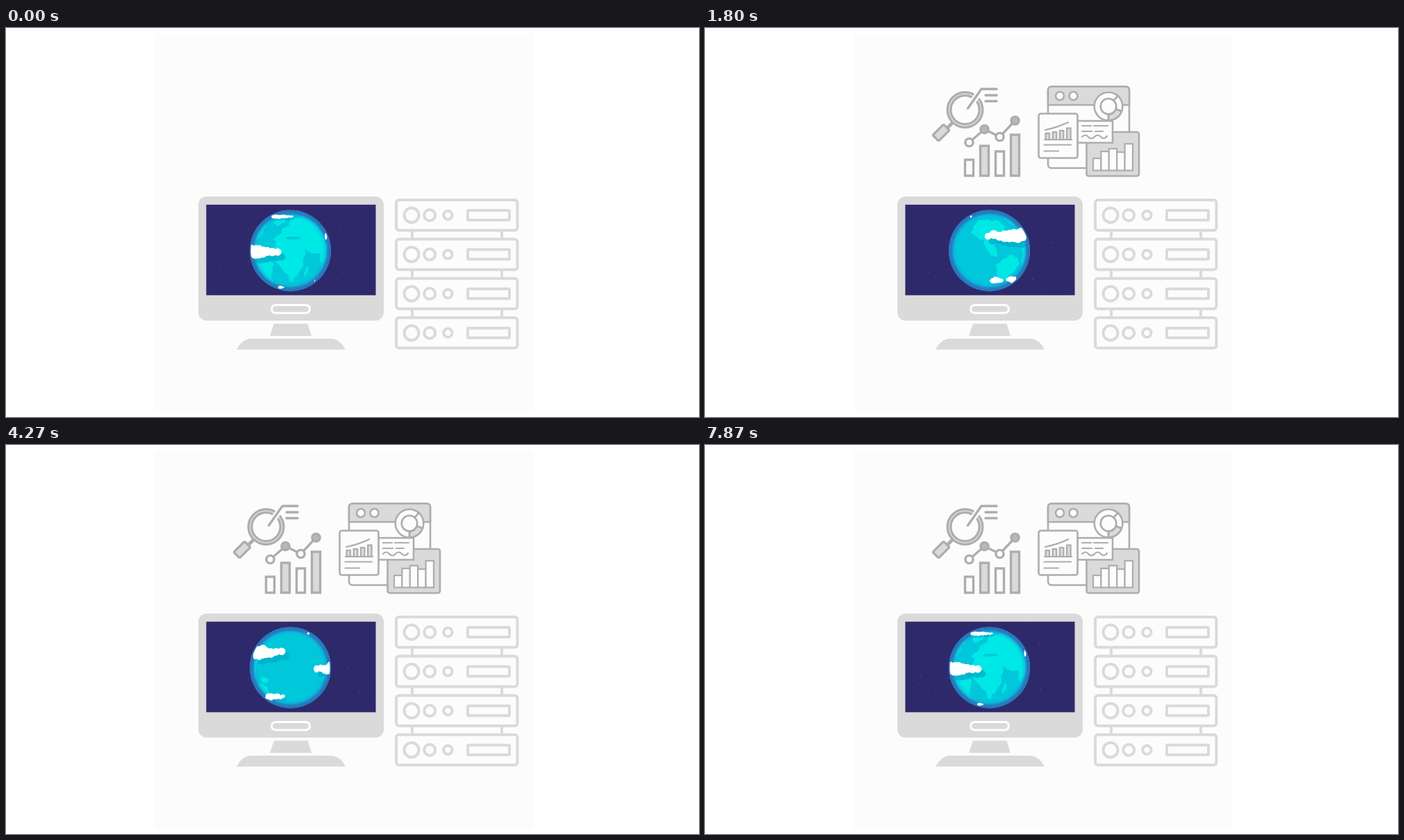
Write an HTML page with a canvas that moves like this. It is 998 px wide and 561 px high and loops after 7.91 s.

```html
<!DOCTYPE html>
<html lang="en">
<head>
<meta charset="utf-8">
<title>Globe on a monitor</title>
<style>
  html, body { margin: 0; width: 100%; height: 100%; overflow: hidden; background: #fff; }
  svg, canvas { position: absolute; display: block; }
  svg { left: 0; top: 0; width: 998px; height: 561px; }
  canvas { left: 288px; top: 254px; width: 246px; height: 133px; }
  .line { fill: none; stroke: #adadad; stroke-width: 3.4; stroke-linecap: round; stroke-linejoin: round; }
  .medium { stroke-width: 2.6; }
  .thin { stroke-width: 2.2; }
  .white { fill: #fcfcfc; }
  .light { fill: #dadada; }
  .dark { fill: #b8b8b8; }
  .rack { fill: none; stroke: #dadada; stroke-width: 4; }
</style>
</head>
<body>
<svg viewBox="0 0 998 561">
  <rect x="214" y="8" width="546" height="545" fill="#fcfcfc"/>

  <g fill="#dadada">
    <rect x="277" y="243" width="267" height="179" rx="12"/>
    <rect x="382.5" y="399.5" width="55" height="11.5" rx="5.7" stroke="#fff" stroke-width="3"/>
    <path d="M386 426.5H434.5L440 444H380Z"/>
    <path d="M332 463.7C337 454 344 448 354 448H467C477 448 484 454 488.8 463.7Z"/>
  </g>

  <g id="racks" class="rack"></g>

  <g id="icons" class="line" visibility="hidden">
    <g id="magnifier">
      <path d="M356 137L348 145" stroke-width="5"/>
      <rect class="light" x="-11" y="-6" width="22" height="12" rx="2" transform="translate(340 151) rotate(-45)"/>
      <circle class="white" cx="374.5" cy="118" r="23" stroke-width="8"/>
      <circle cx="374.5" cy="118" r="23" stroke="#d2d2d2" stroke-width="2"/>
      <path d="M380 114L397 90" stroke="#fcfcfc" stroke-width="9"/>
      <path d="M378.5 116L398 88H420M404 97H420M404 105.5H420"/>
    </g>
    <g id="trend"></g>
    <g id="dashboard" class="medium">
      <rect class="white" x="494" y="84.5" width="117" height="117.5" rx="5"/>
      <path class="light" d="M494 111V89.5Q494 84.5 499 84.5H606Q611 84.5 611 89.5V111Z"/>
      <circle class="white" cx="511" cy="98" r="6"/>
      <circle class="white" cx="530.5" cy="98" r="6"/>
      <rect class="light" x="549.5" y="150" width="75.5" height="63.5" rx="3"/>
      <g id="bigBars" class="thin"></g>
      <rect class="white" x="536" y="134" width="51" height="31.5"/>
      <path class="thin" d="M543 141H556M560 141H580M543 149H557M562 149H573M543 157q4.5 -5 9 0t9 0t9 0t9 -1"/>
      <circle class="white" cx="581" cy="113" r="20.3"/>
      <path class="light" d="M600 120A20.3 20.3 0 0 1 581 133.3V124.5A11.5 11.5 0 0 0 591.5 117Z"/>
      <circle class="white" cx="581" cy="113" r="11.3"/>
      <path d="M588.5 104.5L595 97.5M591.5 117L600 120M581 124.5V133"/>
      <rect class="white" x="480.5" y="123.5" width="56" height="64" rx="3"/>
      <path class="thin" d="M490 147Q509 143 523 136M488.5 168.5H527M488.5 177.5H509M489 161H528"/>
      <g id="smallBars" class="thin"></g>
    </g>
  </g>
</svg>
<canvas id="screen"></canvas>

<script>
const LOOP = 7910, RAD = Math.PI / 180, TAU = 2 * Math.PI;
const R = 56, CX = 409.5, CY = 321, LAND_START = -18;
const SCREEN = [288.4, 254.8, 244.1, 130.6];
const byId = id => document.getElementById(id);

let seed = 17;
const random = () => (seed = seed * 16807 % 2147483647) / 2147483647;

function add(parent, tag, attrs) {
  const node = document.createElementNS('http://www.w3.org/2000/svg', tag);
  for (const key in attrs) node.setAttribute(key, attrs[key]);
  byId(parent).append(node);
}

// Server units
for (let i = 0; i < 4; i++) {
  const y = 248 + 56.6 * i;
  add('racks', 'rect', { x: 562, y, width: 174.5, height: 43.8, rx: 4 });
  [10.5, 8, 6.2].forEach((r, k) => add('racks', 'circle', { cx: 584 + 26.2 * k, cy: y + 22, r }));
  add('racks', 'rect', { x: 665, y: y + 15, width: 60, height: 14, rx: 1 });
  if (i < 3) add('racks', 'path', { d: `M585 ${y + 45}v11M714 ${y + 45}v11` });
}

function bars(parent, x, base, width, step, heights, styles) {
  heights.forEach((height, i) => add(parent, 'rect', {
    x: x + step * i, y: base - height, width, height,
    class: styles[i % styles.length], 'stroke-linejoin': 'miter'
  }));
}
bars('trend', 374.5, 213, 12, 22, [23, 43, 35, 59], ['white', 'light']);
bars('bigBars', 559, 205.5, 11.4, 11.4, [17.5, 27.5, 31.5, 26.5, 38.5], ['white']);
bars('smallBars', 490.5, 161, 5.5, 10.2, [9, 11, 13, 16.5], ['light']);

const levels = [165, 146, 157, 133.5];
add('trend', 'path', { d: 'M' + levels.map((y, i) => `${380.5 + 22 * i} ${y}`).join('L') });
levels.forEach((cy, i) => add('trend', 'circle', {
  cx: 380.5 + 22 * i, cy, r: 5.6, class: i % 2 ? 'dark' : 'white'
}));

// Land: a rough oval that narrows and leans toward its lower end.
function land(lon, y, width, height, taper = 0, lean = 0) {
  const p = random() * TAU, q = random() * TAU;
  return Array.from({ length: 48 }, (_, i) => {
    const a = i / 48 * TAU, s = Math.sin(a);
    const rough = 1 + 0.07 * Math.sin(5 * a + p) + 0.06 * Math.sin(11 * a + q);
    return [lon + width * rough * Math.cos(a) * (1 - taper * s) + lean * s, y + height * rough * s];
  });
}
const lands = [
  land(66, -24, 68, 26, -0.1),      // Eurasia
  land(18, 14, 22, 30, 0.5, 4),     // Africa
  land(78, 10, 9, 12, 0.6),         // India
  land(108, 6, 12, 18, 0.3, -3),    // Southeast Asia
  land(123, 32, 17, 9),             // Australia
  land(139, 18, 8, 4),              // New Guinea
  land(47, 30, 3, 7),               // Madagascar
  land(-64, -28, 30, 17, 0.3, 4),   // North America
  land(-62, -4, 7, 13, 0, 7),       // Central America
  land(-33, 29, 18, 21, 0.5, -5),   // South America
  land(-8, -43, 14, 7, 0.4)         // Greenland
];
const mediterranean = land(22, -18, 12, 2);

// Cloud bank: overlapping puffs, largest in the middle.
function bank(from, to, y, size) {
  const count = Math.ceil((to - from) * RAD * Math.sqrt(R * R - y * y) / (size * 0.85));
  return Array.from({ length: count + 1 }, (_, i) => {
    const u = i / count;
    const r = size * (0.5 + 0.45 * Math.sin(Math.PI * u)) * (0.85 + 0.3 * random());
    return { lon: from + (to - from) * u, y: y + size * 0.3 * (random() - 0.5), r };
  });
}
const bigClouds = [...bank(80, 180, -22, 10), ...bank(237, 341, 2, 10)];
const smallClouds = [
  ...bank(86, 112, 43, 4.6), ...bank(126, 178, 42, 5),
  ...bank(284, 326, 53, 2.2), ...bank(264, 366, -49, 3)
];

const stars = Array.from({ length: 60 }, () => ({
  x: 288 + random() * 245, y: 255 + random() * 131,
  r: 0.3 + random() * 0.4, phase: random() * 360
}));

const canvas = byId('screen'), ctx = canvas.getContext('2d');
const scale = Math.max(1, window.devicePixelRatio || 1);
canvas.width = 246 * scale;
canvas.height = 133 * scale;

const rim = ctx.createRadialGradient(CX, CY, 46, CX, CY, 58.5);
rim.addColorStop(0, 'rgba(0,190,220,0)');
rim.addColorStop(0.4, 'rgba(20,165,215,.45)');
rim.addColorStop(0.62, '#2582c6');
rim.addColorStop(1, '#2b6fb5');

const wrap = a => ((a + 180) % 360 + 360) % 360 - 180;
const rowRadius = y => Math.sqrt(Math.max(0, R * R - y * y));

function disc(x, y, r, color) {
  ctx.beginPath();
  ctx.arc(x, y, r, 0, TAU);
  ctx.fillStyle = color;
  ctx.fill();
}

function drawLand(points, turn, color) {
  const mid = points.reduce((sum, p) => sum + p[0], 0) / points.length;
  const shift = wrap(mid + turn) - mid;
  ctx.beginPath();
  for (const [lon, y] of points) {
    const a = Math.max(-90, Math.min(90, lon + shift));
    ctx.lineTo(CX + rowRadius(y) * Math.sin(a * RAD), CY + y);
  }
  ctx.fillStyle = color;
  ctx.fill();
}

function drawPuffs(puffs, turn, dx, dy, color) {
  ctx.beginPath();
  for (const puff of puffs) {
    const a = wrap(puff.lon + turn) * RAD, depth = Math.cos(a);
    if (depth < 0.05) continue;
    const x = CX + rowRadius(puff.y) * Math.sin(a) + dx, y = CY + puff.y + dy;
    const rx = puff.r * (0.2 + 0.85 * depth);
    ctx.moveTo(x + rx, y);
    ctx.ellipse(x, y, rx, puff.r, 0, 0, TAU);
  }
  ctx.fillStyle = color;
  ctx.fill();
}

function drawSky(angle) {
  ctx.fillStyle = '#2e296b';
  ctx.fillRect(...SCREEN);
  for (const s of stars) {
    const glow = 0.3 + 0.2 * Math.sin((angle + s.phase) * RAD);
    disc(s.x, s.y, s.r, `rgba(160,165,225,${glow})`);
  }
}

function drawGlobe(angle) {
  ctx.save();
  disc(CX, CY, 58.5, '#00c8da');
  ctx.clip();
  for (const shape of lands) drawLand(shape, angle + LAND_START, '#00e8e5');
  drawLand(mediterranean, angle + LAND_START, '#00c8da');
  drawPuffs(bigClouds, -angle, 6, 7, 'rgba(0,172,200,.75)');
  drawPuffs(smallClouds, -angle, 2, 3, 'rgba(0,172,200,.5)');
  disc(CX, CY, 58.5, rim);
  ctx.beginPath();
  ctx.arc(CX, CY, 57, 0, TAU);
  ctx.clip();
  drawPuffs(bigClouds, -angle, 0, 0, '#fff');
  drawPuffs(smallClouds, -angle, 0, 0, '#fff');
  ctx.restore();
}

function draw(now) {
  const t = now % LOOP, angle = 360 * t / LOOP;
  byId('icons').setAttribute('visibility', t < 30 ? 'hidden' : 'visible');
  ctx.setTransform(scale, 0, 0, scale, -288 * scale, -254 * scale);
  ctx.clearRect(288, 254, 246, 133);
  drawSky(angle);
  drawGlobe(angle);
}

const start = performance.now();
function tick() {
  draw(performance.now() - start);
  requestAnimationFrame(tick);
}
tick();
</script>
</body>
</html>
```
